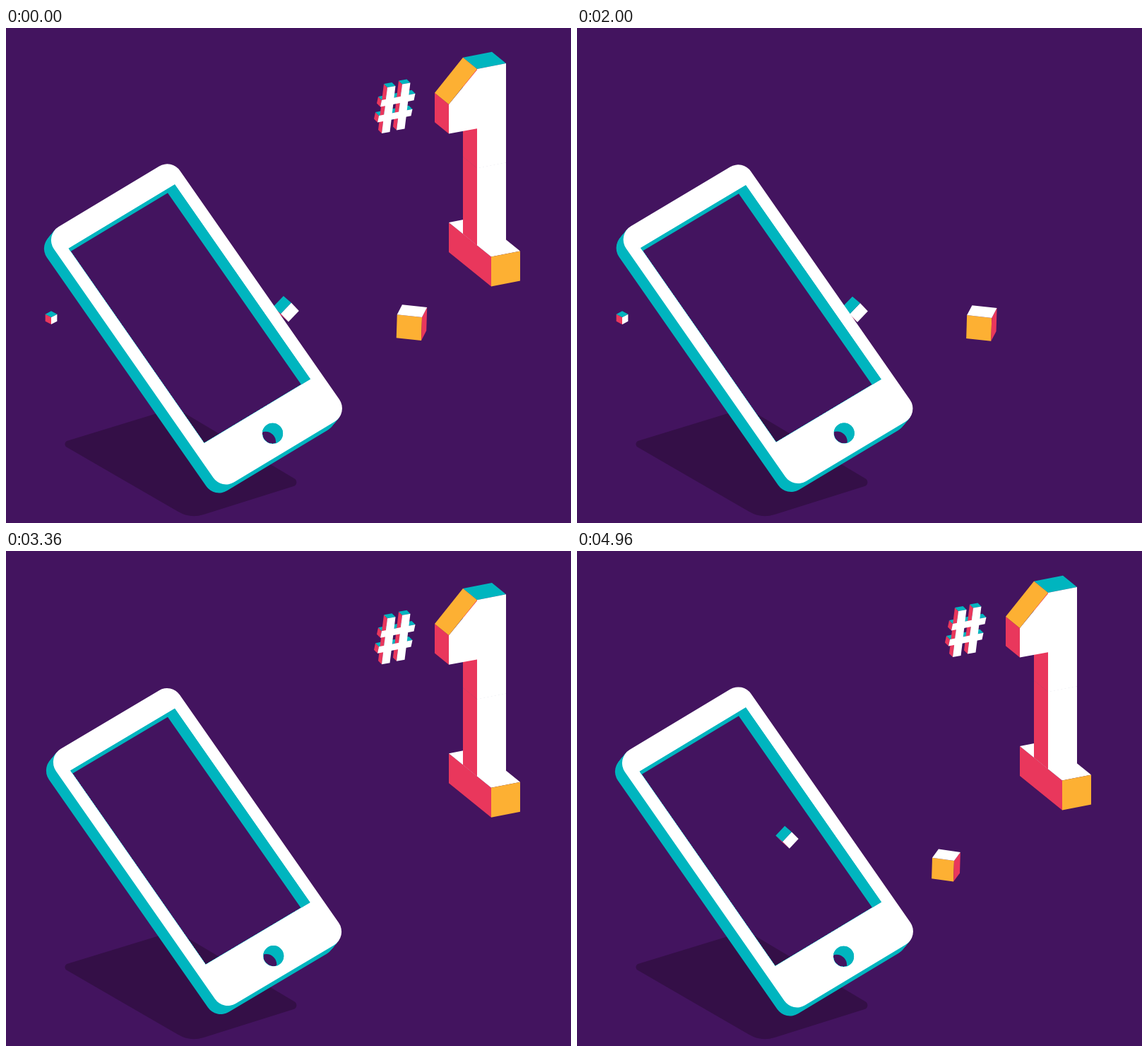
These frames come from a looping animation (800x700 px, 5.04 s). An HTML page with a canvas:

```html
<!DOCTYPE html>
<html lang="en">
<head>
<meta charset="utf-8">
<title>Number one</title>
<style>
html, body { margin: 0; width: 100%; height: 100%; overflow: hidden; background: #43145f; }
canvas { display: block; width: 800px; height: 700px; }
</style>
</head>
<body>
<canvas id="stage" width="800" height="700"></canvas>
<script>
const ctx = document.getElementById('stage').getContext('2d');
const LOOP = 5040, STEP = 80;
const BG = '#43145f', SHADE = '#340f47', TEAL = '#00b5bf', RED = '#e9375c', GOLD = '#fdb033', WHITE = '#fff';

const { sin, cos, exp, PI } = Math;
const clamp = v => Math.min(1, Math.max(0, v));
const add = (...vs) => vs.reduce((a, b) => [a[0] + b[0], a[1] + b[1]]);
const times = (v, n) => [v[0] * n, v[1] * n];
const inOutQuad = p => p < .5 ? 2 * p * p : 1 - 2 * (1 - p) ** 2;
const inOutCubic = p => p < .5 ? 4 * p ** 3 : 1 - 4 * (1 - p) ** 3;
const outBack = p => 1 + 2 * (p - 1) ** 3 + (p - 1) ** 2;

function poly(color, ...pts) {
  ctx.beginPath();
  pts.forEach(p => ctx.lineTo(...p));
  ctx.closePath();
  ctx.fillStyle = color;
  ctx.fill();
}

// Parallelogram from a corner and two edges
const face = (color, p, a, b) => poly(color, p, add(p, a), add(p, a, b), add(p, b));

// Closed path with one radius per corner
function roundPath(pts, radii) {
  const path = new Path2D(), n = pts.length;
  path.moveTo(...times(add(pts[n - 1], pts[0]), .5));
  pts.forEach((p, i) => path.arcTo(...p, ...pts[(i + 1) % n], radii[i]));
  path.closePath();
  return path;
}

function moved(path, [e, f]) {
  const out = new Path2D();
  out.addPath(path, { e, f });
  return out;
}

// ---- phone ----
const THICK = [-10, 12];
const shadow = roundPath([[76, 587], [240, 537], [420, 644], [261, 694]], [5, 12, 6, 45]);

function phone(t) {
  // Slow sway: the frame narrows a little and returns
  const k = ((1 + cos((t - 2920) / LOOP * 2 * PI)) / 2) ** 2;
  const origin = [88.6 + 3 * k, 311.7 - 1.5 * k];
  const across = [150.4 - 3 * k, -90.4 + 3.2 * k];
  const along = [192 - .5 * k, 275.2 - k];
  const at = (u, v) => add(origin, times(across, u), times(along, v));
  const quad = (u0, u1, v0, v1, r) =>
    roundPath([at(u0, v0), at(u1, v0), at(u1, v1), at(u0, v1)], [r, r, r, r]);

  const body = quad(-.1, 1.098, -.1, 1.207, 22);
  const holes = quad(0, 1, 0, 1, 0), button = new Path2D(), page = new Path2D();
  button.arc(377.5 + 1.4 * k, 573.4 - .8 * k, 14.6, 0, 2 * PI);
  holes.addPath(button);
  page.rect(0, 0, 800, 700);
  const without = hole => {
    const path = new Path2D(page);
    path.addPath(hole);
    return path;
  };

  ctx.save();
  ctx.clip(without(holes), 'evenodd');
  ctx.fillStyle = TEAL;
  for (let i = 1; i <= 12; i++) ctx.fill(moved(body, times(THICK, i / 12)));
  ctx.fillStyle = WHITE;
  ctx.fill(body);
  ctx.restore();

  // Inner walls of the screen and the button
  ctx.save();
  ctx.clip(holes);
  ctx.fillStyle = TEAL;
  ctx.fill(without(moved(holes, THICK)), 'evenodd');
  ctx.restore();
}

// ---- flying cubes ----
// Turned cube seen without perspective; x, y is its near corner
function cube(x, y, size, yaw, pitch, roll, top, left, right) {
  if (size < .5) return;
  ctx.save();
  ctx.translate(x, y);
  ctx.rotate(roll);
  ctx.scale(size, size);
  const a = [cos(yaw), -sin(yaw) * sin(pitch)];
  const b = [-sin(yaw), -cos(yaw) * sin(pitch)];
  const down = [0, cos(pitch)];
  face(left, [0, 0], b, down);
  face(right, [0, 0], a, down);
  face(top, [0, 0], a, b);
  ctx.restore();
}

// Grows from one moment and is gone at another
const life = (t, from, to) => clamp((t - from) / 60) * clamp((to - t) / 120);

function flight(t) {
  const tumble = inOutQuad(clamp((t + 80) / 640)), glide = exp(-t / 160);
  cube(540 - 151 * glide, 411 - 223 * tumble, (21.5 + .033 * t) * life(t, -140, 690),
    .05 + .5 * tumble, .75 - .29 * tumble, -PI / 4 * (1 - tumble), TEAL, RED, WHITE);

  const slow = exp(-t / 228);
  cube(720 - 131 * slow, 340 + 69 * slow, (45 - 9 * slow) * life(t, -240, 440),
    PI / 2 - .19 * slow, .41, .03, WHITE, GOLD, RED);

  cube(64, 409 - .03 * t, 11.8 * life(t, -70, 320), PI / 4, .55, 0, TEAL, RED, WHITE);
}

// ---- hash sign and digit ----
const RIGHT = [41, -8], BACK = [-20, -16.2];

function box(x, y, height, depth, top, left, front) {
  const p = [x, y], down = [0, height], back = times(BACK, depth);
  face(left, p, back, down);
  face(top, p, back, RIGHT);
  face(front, p, RIGHT, down);
}

function hash() {
  const bars = [];
  for (const i of [0, 1]) bars.push([[532 - 4 * i, 102 + 22 * i], [47.5, -9.3], [-2, 9.5]]);
  for (const i of [0, 1]) bars.push([[540 + 21 * i, 84 - 4.5 * i], [11.5, -2], [-8, 65]]);
  for (const [p, a, b] of bars) {
    face(RED, p, b, [-5, -5]);
    face(TEAL, p, a, [-5, -5]);
  }
  bars.forEach(bar => face(WHITE, ...bar));
}

function foot() {
  box(687, 323.5, 42, 3, WHITE, RED, GOLD);
}

function stem() {
  box(667, 198, 109.5, 1, TEAL, RED, WHITE);
}

function head() {
  const tip = [627, 108], crown = [667, 58];
  box(...crown, 140.5, 1, TEAL, RED, WHITE);
  poly(WHITE, [668, 58], [668, 142], [627, 149.5], tip);
  face(RED, tip, BACK, [0, 41.5]);
  face(GOLD, tip, BACK, add(crown, times(tip, -1)));
}

// In the order of the collapse, each shrinking to its pivot
const parts = [
  { draw: foot, x: 678, y: 313, grow: 2400 },
  { draw: stem, x: 680, y: 301, grow: 2400 },
  { draw: head, x: 680, y: 186, grow: 2400 },
  { draw: hash, x: 550, y: 112, grow: 2785 }
];

// Slow rise that gathers speed, then settles
function drift(t) {
  const rise = 11.3 - 3.42e-6 * (Math.min(t, 5600) - 3226) ** 2;
  return rise - 3.7 * (1 - exp(Math.min(0, (5600 - t) / 228)));
}

function numberOne(time) {
  const t = time < 1300 ? time + LOOP : time;
  parts.forEach(({ draw, x, y, grow }, i) => {
    const shrink = inOutCubic(clamp((t - LOOP - 326 - 160 * i) / 360));
    const scale = outBack(clamp((t - grow) / 420)) * (1 - shrink);
    if (scale < .01) return;
    ctx.save();
    ctx.translate(x, y + drift(t));
    ctx.scale(scale, scale);
    ctx.translate(-x, -y);
    draw();
    ctx.restore();
  });
}

function render(t) {
  ctx.fillStyle = BG;
  ctx.fillRect(0, 0, 800, 700);
  ctx.fillStyle = SHADE;
  ctx.fill(shadow);
  flight(t > LOOP - 400 ? t - LOOP : t);
  flight(t - 2003);
  phone(t);
  numberOne(t);
}

const begin = performance.now();
function tick() {
  const t = (performance.now() - begin) % LOOP;
  render(Math.floor(t / STEP) * STEP);
  requestAnimationFrame(tick);
}
tick();
</script>
</body>
</html>
```
